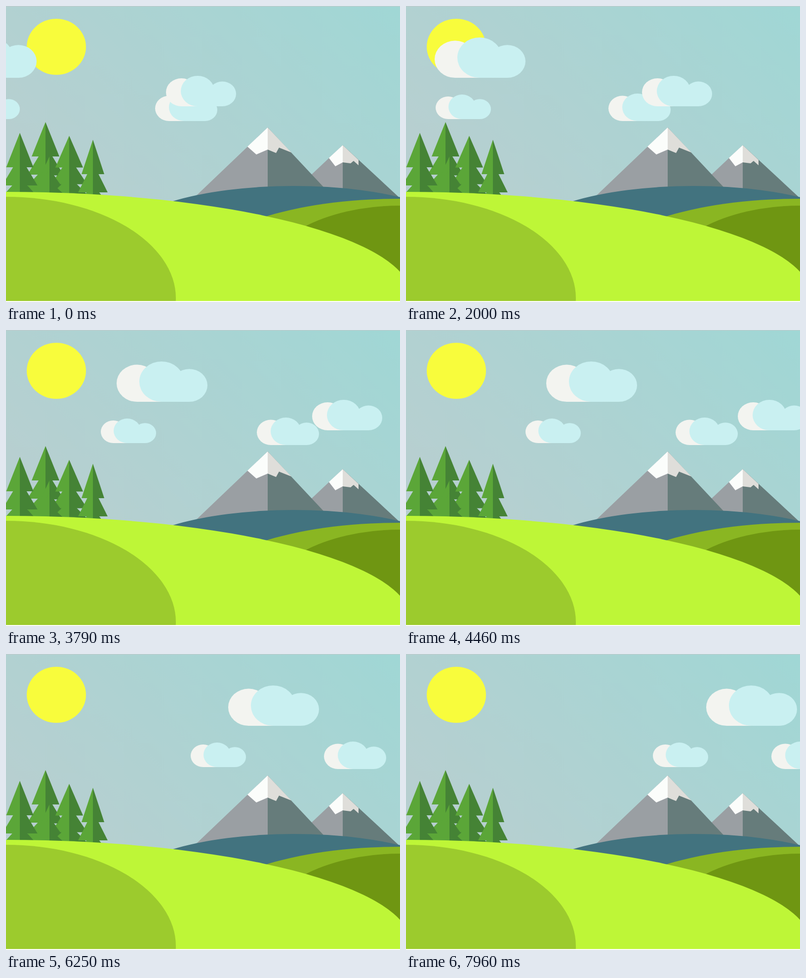
Animation of 798 by 602 pixels, one loop 8 s. Source, as an HTML page:

```html
<!DOCTYPE html>
<html lang="en">
<head>
<meta charset="utf-8">
<title>Clouds over the hills</title>
<style>
  html, body { margin: 0; width: 100%; height: 100%; overflow: hidden; background: #fff; }
  svg { display: block; width: 798px; height: 602px; }
</style>
</head>
<body>
<svg viewBox="0 0 798 602">
  <defs>
    <linearGradient id="sky" gradientUnits="userSpaceOnUse" x1="50" y1="651" x2="749" y2="-48">
      <stop offset=".25" stop-color="#b7cfd0"/>
      <stop offset="1" stop-color="#a0d7d5"/>
    </linearGradient>
    <clipPath id="ground"><rect width="798" height="600"/></clipPath>
  </defs>

  <g clip-path="url(#ground)">
    <rect width="798" height="600" fill="url(#sky)"/>
    <rect width="798" height="1" fill="#c0c9ca"/>
    <ellipse cx="102" cy="83" rx="60" ry="57" fill="#f8fc3c"/>
    <g id="clouds"></g>

    <g id="mountains">
      <path fill="#9a9fa3" d="M682 283 571 388V400H682Z"/>
      <path fill="#667c7b" d="M682 283 798 391V400H682Z"/>
      <path fill="#fbfdfb" d="M682 283 654 309 667 326 682 318Z"/>
      <path fill="#dfdeda" d="M682 283 714 313V324L704 315 698 320 682 318Z"/>
      <path fill="#9a9fa3" d="M530 247 384 387 372 400H530Z"/>
      <path fill="#667c7b" d="M530 247 642 367 672 400H530Z"/>
      <path fill="#fbfdfb" d="M530 247 489 286 507 302 530 292Z"/>
      <path fill="#dfdeda" d="M530 247V292L547 299 553 288 578 298Z"/>
    </g>

    <ellipse cx="583" cy="474" rx="350" ry="108" fill="#42737f"/>
    <ellipse cx="798" cy="528" rx="400" ry="136" fill="#8ab622"/>
    <ellipse cx="798" cy="561" rx="280" ry="155" fill="#6f9612"/>
    <g id="trees"></g>
    <ellipse cy="589" rx="820" ry="211" fill="#bef637"/>
    <ellipse cy="594" rx="344" ry="206" fill="#9ccb2d"/>
  </g>
</svg>

<script>
const byId = id => document.getElementById(id);

// One tier of a tree: a triangle with a light left and a dark right half.
const tier = (x, top, base, half) =>
  `<path fill="#5ba638" d="M${x} ${top}L${x - half} ${base}H${x}Z"/>` +
  `<path fill="#458335" d="M${x} ${top}L${x + half} ${base}H${x}Z"/>`;

// All trees share one outline, scaled by the half width of the top tier and by height.
const tree = (x, top, half, scale = 1) =>
  tier(x, top, top + 70 * scale, half) +
  tier(x, top + 47 * scale, top + 107 * scale, half * 1.3) +
  tier(x, top + 90 * scale, top + 145 * scale, half * 1.8);

byId('trees').innerHTML =
  tree(80, 236, 28) + tree(128, 264, 28, 0.92) + tree(88, 306, 18, 0.55) +
  tree(176, 272, 23) + tree(28, 258, 27.5);

// The main puff starts at `inset`; `lap` is the time in seconds to drift 1100 px.
const clouds = [
  { x: 302, base: 234, width: 126, height: 56, inset: 28, lap: 20 },
  { x: 324.3, base: 204, width: 142, height: 62, inset: 30, lap: 14 },
  { x: -84, base: 230, width: 112, height: 50, inset: 26, lap: 15 },
  { x: -122, base: 146, width: 184, height: 82, inset: 46, lap: 12 },
];

function drawCloud({ base, width, height, inset }) {
  const rx = h => h * 0.55;
  const puff = (x, h) =>
    `<ellipse cx="${x}" cy="${base - h / 2}" rx="${rx(h)}" ry="${h / 2}"/>`;
  const fill = (x1, x2, h) =>
    `<rect x="${x1}" y="${base - h / 2}" width="${x2 - x1}" height="${h / 2}"/>`;
  const backHeight = height * 0.92, sideHeight = height * 0.815;
  const back = rx(backHeight), main = inset + rx(height), side = width - rx(sideHeight);
  return `<g><g fill="#f3f4f0">${puff(back, backHeight)}${fill(back, main, backHeight)}</g>` +
    `<g fill="#c9f0f1">${puff(main, height)}${puff(side, sideHeight)}` +
    `${fill(main, side, sideHeight)}</g></g>`;
}
byId('clouds').innerHTML = clouds.map(drawCloud).join('');
const groups = [...byId('clouds').children];

const LOOP = 8000, FPS = 24, START_DELAY = 0.038;

function render() {
  const time = performance.now() % LOOP;
  const tick = Math.min(LOOP / 1000 * FPS - 1, Math.floor(time / 1000 * FPS + 0.15));
  const seconds = Math.max(0, tick / FPS - START_DELAY);
  clouds.forEach(({ x, lap }, i) => {
    const left = 2 * Math.floor((x + seconds * 1107 / lap) / 2);
    groups[i].setAttribute('transform', `translate(${left} 0)`);
  });
  requestAnimationFrame(render);
}
render();
</script>
</body>
</html>
```
